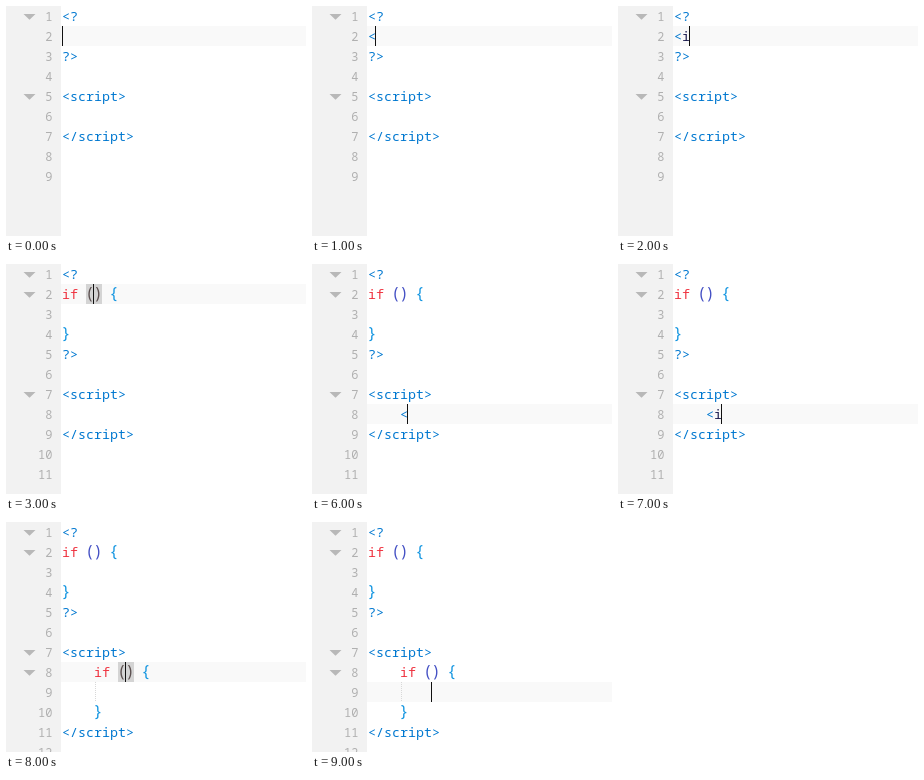
Recreate the animation shown at these times as an HTML page with a canvas. Size 300x230 px, loop 10 s.

```html
<!DOCTYPE html>
<html lang="en">
<head>
<meta charset="utf-8">
<title>Snippet expansion</title>
<style>
html, body { margin: 0; width: 100%; height: 100%; overflow: hidden; background: #fff; }
canvas { display: block; }
</style>
</head>
<body>
<canvas id="stage" width="300" height="230"></canvas>
<script>
const ctx = document.getElementById('stage').getContext('2d');
const LOOP = 10000, ROW = 20, CHAR = 8, LEFT = 56, GUTTER = 55;
const FAMILY = '"Noto Sans Mono", monospace';
const NUMBER_FONT = '12px ' + FAMILY;
const CODE_FONT = '500 13.333px ' + FAMILY;
const BRACKET_FONT = '15.5px ' + FAMILY;
const BLUE = '#0078d0', RED = '#ef3340', INDIGO = '#4450c4',
      SKY = '#1094e0', NAVY = '#1c1c50', MATCH = '#5c5050';

const TAB = '    ';
const block = indent => [indent + 'if () {', '', indent + '}'];

function buildLines(step) {
  const typed = ['', '<', '<i'];
  const php = step < 3 ? [typed[step]] : block('');
  const js = step < 6 ? [''] : step < 8 ? [TAB + typed[step - 5]] : block(TAB);
  return ['<?', ...php, '?>', '', '<script>', ...js, '<\/script>', '', ''];
}

// Row and column of the caret, one entry per second.
const CARETS = [[1, 0], [1, 1], [1, 2], [1, 4], [2, 4],
                [7, 4], [7, 5], [7, 6], [7, 8], [8, 8]];

function tokenColor(line, ch, matched) {
  if (ch === '(' || ch === ')') return matched ? MATCH : INDIGO;
  if (ch === '{' || ch === '}') return SKY;
  const word = line.trim();
  if (word.startsWith('if')) return RED;
  return word === '<i' && ch === 'i' ? NAVY : BLUE;
}

function fill(color, x, y, w, h) {
  ctx.fillStyle = color;
  ctx.fillRect(x, y, w, h);
}

function drawFold(y) {
  ctx.fillStyle = '#b8b8b8';
  ctx.beginPath();
  ctx.moveTo(17.5, y + 8);
  ctx.lineTo(29.5, y + 8);
  ctx.lineTo(23.5, y + 13.7);
  ctx.fill();
}

// Dotted guide on the empty line inside an indented block.
function drawGuide(y) {
  for (let dot = 0; dot < ROW; dot += 2) fill('#d8d8d8', LEFT + 4 * CHAR + 1, y + dot, 1, 1);
}

function drawLine(line, row, matched) {
  const y = row * ROW;
  ctx.font = NUMBER_FONT;
  ctx.textAlign = 'right';
  ctx.fillStyle = '#b0b0b0';
  ctx.fillText(row + 1, 46.5, y + 15);
  if (/^(<\?|<script>|\s*if )/.test(line)) drawFold(y);
  if (line.startsWith(TAB + 'if')) drawGuide(y + ROW);

  ctx.textAlign = 'center';
  [...line].forEach((ch, col) => {
    if (ch === ' ') return;
    ctx.font = /[(){}]/.test(ch) ? BRACKET_FONT : CODE_FONT;
    ctx.fillStyle = tokenColor(line, ch, matched);
    ctx.fillText(ch, LEFT + (col + 0.5) * CHAR, y + 15);
  });
}

function draw(time) {
  const step = Math.floor((time % LOOP) / 1000);
  const [row, col] = CARETS[step];
  const matching = step === 3 || step === 8;

  fill('#fff', 0, 0, 300, 230);
  fill('#f2f2f2', 0, 0, GUTTER, 230);
  fill('#f9f9f9', GUTTER, row * ROW, 300 - GUTTER, ROW);
  if (matching) fill('#d4d4d4', LEFT + (col - 1) * CHAR, row * ROW, 2 * CHAR, ROW);
  buildLines(step).forEach((line, i) => drawLine(line, i, matching && i === row));
  fill('#111', Math.max(LEFT, GUTTER + col * CHAR), row * ROW, 1, ROW);
}

const start = performance.now();
function tick() {
  draw(performance.now() - start);
  requestAnimationFrame(tick);
}
tick();
</script>
</body>
</html>
```
